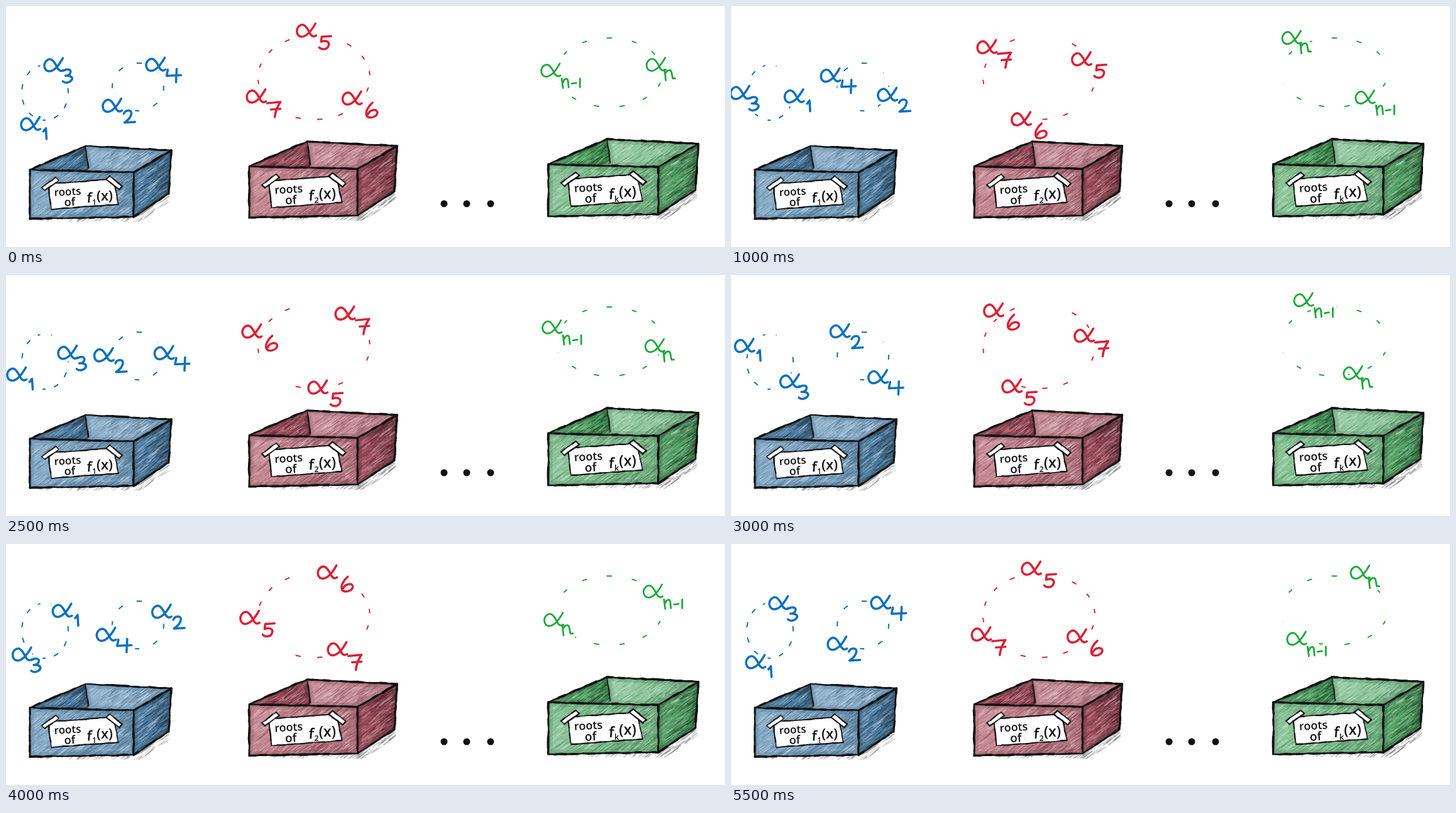
Write an HTML page with a canvas that moves like this. It is 1144 by 384 pixels and loops after 6 s.

```html
<!DOCTYPE html>
<html lang="en">
<head>
<meta charset="utf-8">
<title>Permuting roots</title>
<style>
  html, body { margin: 0; width: 100%; height: 100%; overflow: hidden; background: #fff; }
  canvas { display: block; }
</style>
</head>
<body>
<canvas id="stage" width="1144" height="384"></canvas>
<script>
const W = 1144, H = 384, STEP = 500, STEPS = 12, RAD = Math.PI / 180;
const ctx = document.getElementById('stage').getContext('2d');

// Handwritten strokes, relative to the middle of the alpha
const ALPHA = 'M15-11C10-2 2 10-7 10C-15 9-17-1-11-7C-4-13 1-6 5 2C8 9 12 11 16 8';
const SUBS = {
  1: 'M21 12L25 7L26 24',
  2: 'M19 13C22 6 32 6 31 13C30 19 25 24 20 27L37 26',
  3: 'M16 9C22 5 29 7 27 12C26 16 22 17 19 17C29 16 32 21 28 25C24 29 18 29 15 26',
  4: 'M20 8L18 18L41 17M34 7L33 28',
  5: 'M40 9L25 10L24 18C32 15 38 18 36 24C34 31 25 31 21 27',
  6: 'M33 7C26 13 21 22 24 28C28 33 40 30 41 23C41 17 30 17 26 25',
  7: 'M18 11L39 9C34 16 31 24 30 33M24 21L39 20',
  n: 'M14 8L16 25M15 15C18 8 24 7 25 12L27 22L31 22',
  'n-1': 'M18 13L20 28M20 19C22 12 28 12 28 17L29 27M34 21L41 20M47 13L47 27'
};
const glyphs = {};
for (const k in SUBS) glyphs[k] = new Path2D(ALPHA + SUBS[k]);

// Letters share the ellipse at equal spacing and turn by `rate` degrees a step.
// The loop opens on the pose of step `home`.
const BLUE = '#0a70bd', RED = '#db2035', GREEN = '#1ba838';
const CYCLES = [
  { color: BLUE, width: 3.5, letters: ['3', '1'], c: [57, 141], r: [43, 52],
    phase: 78, rate: 52.5, home: 11, ring: { c: [62, 138], r: [37, 44], count: 11, from: -4 } },
  { color: BLUE, width: 3.5, letters: ['4', '2'], c: [203, 126], r: [48, 47],
    phase: 93, rate: 53, home: 11, ring: { c: [210, 129], r: [41, 38], count: 8, from: 3 } },
  { color: RED, width: 3.5, letters: ['5', '6', '7'], c: [475, 110], r: [88, 71],
    phase: -86, rate: 32.5, home: 11, ring: { c: [490, 114], r: [89, 67], count: 16, from: 84 } },
  { color: GREEN, width: 2.8, letters: ['n', 'n-1'], c: [950, 98], r: [84, 66],
    phase: 128, rate: 49, home: 12, ring: { c: [960, 106], r: [85, 55], count: 13, from: 270 } }
];

function onEllipse([cx, cy], [rx, ry], deg) {
  return [cx + rx * Math.cos(deg * RAD), cy + ry * Math.sin(deg * RAD)];
}

function eachLetter(step, paint) {
  for (const cycle of CYCLES) {
    const { letters, c, r, phase, rate, home } = cycle;
    letters.forEach((k, i) => {
      const turn = phase + rate * (step || home) + 360 * i / letters.length;
      ctx.save();
      ctx.translate(...onEllipse(c, r, turn));
      paint(glyphs[k], cycle);
      ctx.restore();
    });
  }
}

function drawRing({ color, ring: { c, r, count, from } }) {
  ctx.strokeStyle = color;
  ctx.lineWidth = 2;
  const half = 3.5 / Math.max(...r) / RAD;
  for (let i = 0; i < count; i++) {
    const t = from + 360 * i / count;
    ctx.beginPath();
    ctx.moveTo(...onEllipse(c, r, t - half));
    ctx.lineTo(...onEllipse(c, r, t + half));
    ctx.stroke();
  }
}

function erase(glyph) {
  ctx.strokeStyle = '#fff';
  ctx.lineWidth = 13;
  ctx.stroke(glyph);
}

function write(glyph, { color, width }) {
  ctx.strokeStyle = color;
  ctx.lineWidth = width;
  ctx.stroke(glyph);
}

// ---- Boxes, sketched once ----
const sketch = document.createElement('canvas');
sketch.width = W;
sketch.height = H;
const pen = sketch.getContext('2d');
pen.lineCap = pen.lineJoin = 'round';

let seed = 7;
const rnd = () => (seed = (seed * 16807) % 2147483647) / 2147483647;

function trace(points) {
  pen.beginPath();
  points.forEach(p => pen.lineTo(...p));
  pen.closePath();
}

// Slanted pencil strokes inside a polygon, denser to the right
function scratch(points, dark, count) {
  const xs = points.map(p => p[0]), ys = points.map(p => p[1]);
  const x0 = Math.min(...xs), w = Math.max(...xs) - x0;
  const y0 = Math.min(...ys), h = Math.max(...ys) - y0;
  pen.save();
  trace(points);
  pen.clip();
  for (let i = 0; i < count; i++) {
    const pale = rnd() < .35, len = 5 + rnd() * 14;
    const x = x0 + w * (pale ? rnd() : Math.sqrt(rnd())) - len / 2;
    const y = y0 + h * rnd() + len / 3;
    pen.strokeStyle = pale ? '#fff' : dark;
    pen.globalAlpha = pale ? .2 : .33;
    pen.lineWidth = .7 + rnd();
    pen.beginPath();
    pen.moveTo(x, y);
    pen.lineTo(x + len, y - len * (.6 + rnd() * .3));
    pen.stroke();
  }
  pen.restore();
}

function face(points, base, dark, count) {
  trace(points);
  pen.fillStyle = base;
  pen.fill();
  scratch(points, dark, count);
  // Smudged rim
  pen.save();
  trace(points);
  pen.clip();
  pen.strokeStyle = dark;
  pen.globalAlpha = .2;
  for (pen.lineWidth of [6, 13]) pen.stroke();
  pen.restore();
}

// Slightly wavering ink line
function ink(a, b, width) {
  const n = Math.ceil(Math.hypot(b[0] - a[0], b[1] - a[1]) / 9);
  pen.strokeStyle = '#111';
  let [px, py] = a;
  for (let i = 1; i <= n; i++) {
    const x = a[0] + (b[0] - a[0]) * i / n + rnd() - .5;
    const y = a[1] + (b[1] - a[1]) * i / n + rnd() - .5;
    pen.lineWidth = width * (.7 + rnd() * .6);
    pen.beginPath();
    pen.moveTo(px, py);
    pen.lineTo(x, y);
    pen.stroke();
    [px, py] = [x, y];
  }
}

function paper(points) {
  trace(points);
  pen.fillStyle = '#fff';
  pen.fill();
  points.forEach((p, i) => ink(p, points[(i + 1) % points.length], 1.9));
}

function word(text, x, y, size, tilt = 0) {
  pen.save();
  pen.translate(x, y);
  pen.rotate(tilt);
  pen.font = '600 ' + size + 'px "Open Sans", sans-serif';
  pen.fillStyle = '#111';
  pen.fillText(text, 0, 0);
  pen.restore();
}

function label(sub) {
  paper([[29, -56], [133, -63], [141, -23], [34, -15]]);
  paper([[19, -50], [41, -66], [46, -61], [24, -45]]);
  paper([[121, -63], [127, -68], [147, -52], [142, -47]]);
  word('roots', 39, -36, 17, -.06);
  word('of', 55, -20, 18, -.06);
  word('f', 90, -26, 22, .08);
  word(sub, 99, -22, 12);
  word('(x)', 106, -29, 22);
}

// A box whose front lower left corner stands at x, y
function box(x, y, scale, hue, sat, sub) {
  const tone = l => `hsl(${hue} ${sat}% ${l}%)`, deep = tone(17), mid = tone(36);
  const fl = [0, -78], fr = [165, -74], br = [165, -3], bl = [0, 0];
  const kl = [88, -116], kr = [225, -109], lr = [221, -40], inner = [93, -81], lip = [93, -75];
  pen.save();
  pen.translate(x, y);
  pen.scale(scale, scale);
  scratch([bl, br, lr, [224, -28], [175, 5], [10, 4]], '#555', 420);
  face([kl, kr, fr, lip, inner], tone(68), mid, 260);
  face([fl, kl, inner, lip], tone(50), deep, 200);
  face([fl, fr, br, bl], tone(64), mid, 800);
  face([fr, kr, lr, br], tone(47), deep, 420);
  ink(kl, inner, 1.8);
  for (const [a, b] of [[fl, kl], [kl, kr], [kr, fr], [fr, fl], [fl, bl], [bl, br], [fr, br], [br, lr], [kr, lr]])
    ink(a, b, 2.9);
  label(sub);
  pen.restore();
}

box(38, 339, 1, 206, 36, '1');
box(387, 337, 1.045, 350, 34, '2');
box(863, 335, 1.06, 134, 33, 'k');

pen.fillStyle = '#111';
for (const x of [697, 733, 771]) {
  pen.beginPath();
  pen.arc(x, 315, 5.5, 0, 7);
  pen.fill();
}

function draw(now) {
  const step = Math.floor(now / STEP) % STEPS;
  ctx.fillStyle = '#fff';
  ctx.fillRect(0, 0, W, H);
  ctx.lineCap = ctx.lineJoin = 'round';
  CYCLES.forEach(drawRing);
  // The rings keep gaps at the opening pose and around the letters
  eachLetter(0, erase);
  eachLetter(step, erase);
  ctx.drawImage(sketch, 0, 0);
  eachLetter(step, write);
}

const start = performance.now();
function tick() {
  draw(performance.now() - start);
  requestAnimationFrame(tick);
}
tick();
</script>
</body>
</html>
```
